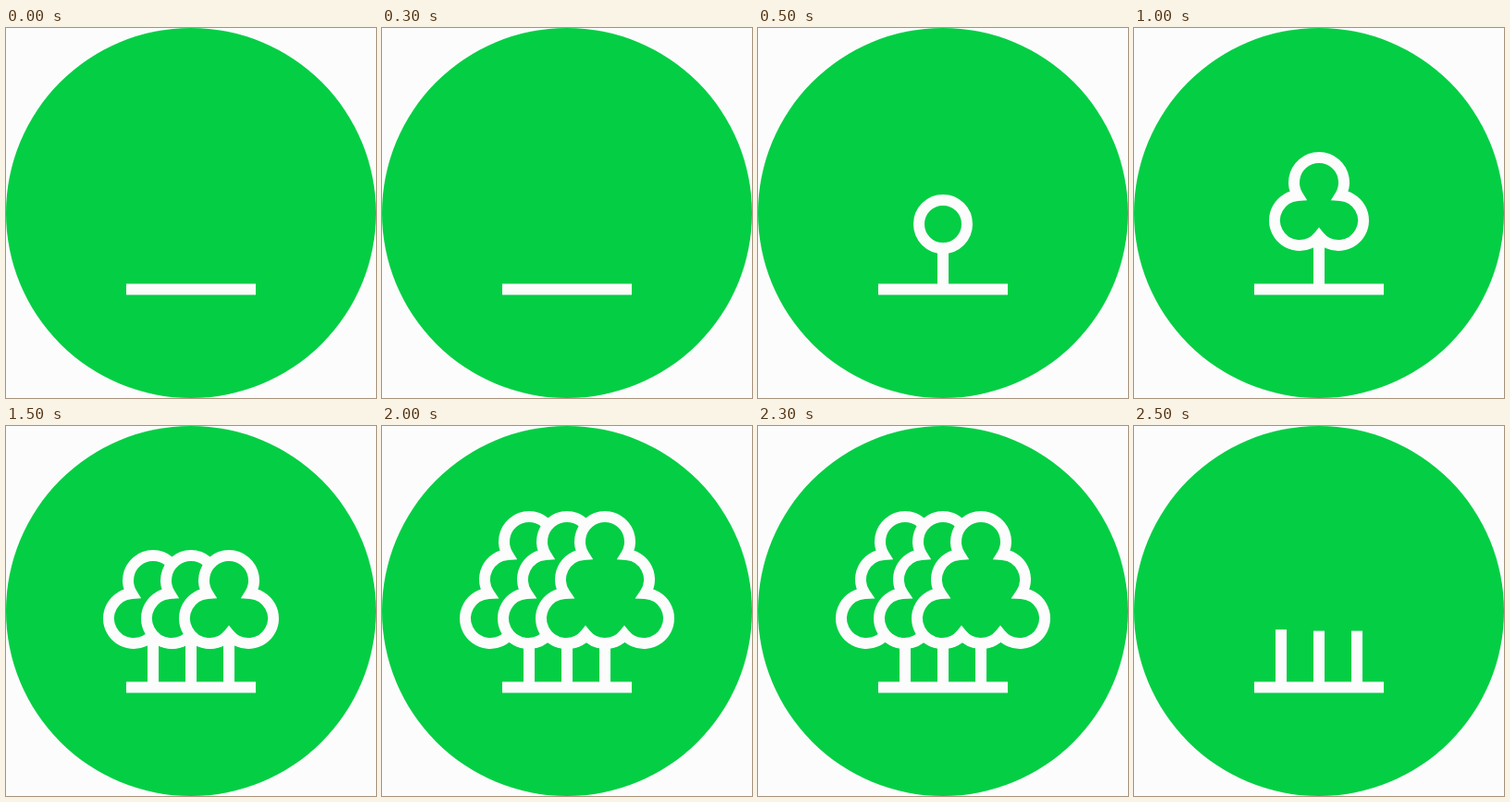
An HTML page that plays this animation: 400 by 400 pixels, repeating every 3 s.

```html
<!DOCTYPE html>
<html lang="en">
<head>
<meta charset="utf-8">
<title>Growing trees</title>
<style>
  html, body { margin: 0; width: 100%; height: 100%; overflow: hidden; background: #fcfcfc; }
  svg { display: block; width: 100vw; height: 100vh; }
  .disc { fill: #04ce44; }
  .line { fill: #fcfcfc; }
  .leaf { fill: #04ce44; stroke: #fcfcfc; stroke-width: 12; stroke-linejoin: miter; }
</style>
</head>
<body>
<svg id="stage" viewBox="0 0 400 400">
  <circle class="disc" cx="200" cy="200" r="200"/>
  <rect class="line" x="130" y="276.5" width="140" height="12"/>
</svg>
<script>
const STEP = 500, STEPS = 6, LOBE = 27, GAP = 41;
const stage = document.getElementById('stage');

// Lobe centres, clockwise, relative to the trunk axis
const SMALL = [[0, 167], [21, 208], [-21, 208]];
const LARGE = [[0, 125], [21, 166], [42, 208], [0, 208], [-42, 208], [-21, 166]];

function add(tag, attrs) {
  const el = document.createElementNS('http://www.w3.org/2000/svg', tag);
  for (const key in attrs) el.setAttribute(key, attrs[key]);
  return stage.appendChild(el);
}

// Visible from step `from` up to step `to`
function show(el, from, to) {
  const frames = [];
  for (let i = 0; i <= STEPS; i++) {
    const on = i >= from && i < to;
    frames.push({ offset: i / STEPS, opacity: on ? 1 : 0, easing: 'step-end' });
  }
  el.animate(frames, { duration: STEP * STEPS, iterations: Infinity }).startTime = 0;
}

// Outer crossing of two neighbouring lobes
function notch([ax, ay], [bx, by]) {
  const dx = bx - ax, dy = by - ay, d = Math.hypot(dx, dy);
  const h = Math.sqrt(LOBE * LOBE - d * d / 4) / d;
  return [(ax + bx) / 2 + dy * h, (ay + by) / 2 - dx * h];
}

function crownPath(lobes) {
  const n = lobes.length;
  const ends = lobes.map((c, i) => notch(c, lobes[(i + 1) % n]));
  let d = 'M' + ends[n - 1];
  lobes.forEach(([cx, cy], i) => {
    const [sx, sy] = ends[(i + n - 1) % n], [ex, ey] = ends[i];
    const cross = (sx - cx) * (ey - cy) - (sy - cy) * (ex - cx);
    d += `A${LOBE} ${LOBE} 0 ${cross < 0 ? 1 : 0} 1 ${ex} ${ey}`;
  });
  return d + 'Z';
}

function trunk(side, top, from) {
  const attrs = { class: 'line', x: 194 + side * GAP, y: top, width: 12, height: 277 - top };
  show(add('rect', attrs), from, STEPS);
}

function crown(lobes, side, from, to) {
  const attrs = { class: 'leaf', d: crownPath(lobes), transform: `translate(${200 + side * GAP})` };
  show(add('path', attrs), from, to);
}

trunk(-1, 220, 3);
trunk(0, 221.5, 1);
trunk(1, 221.5, 3);

show(add('circle', { class: 'leaf', cx: 200, cy: 212, r: 26 }), 1, 2);
for (const side of [-1, 0, 1]) crown(SMALL, side, side ? 3 : 2, 4);
for (const side of [-1, 0, 1]) crown(LARGE, side, 4, 5);
</script>
</body>
</html>
```
